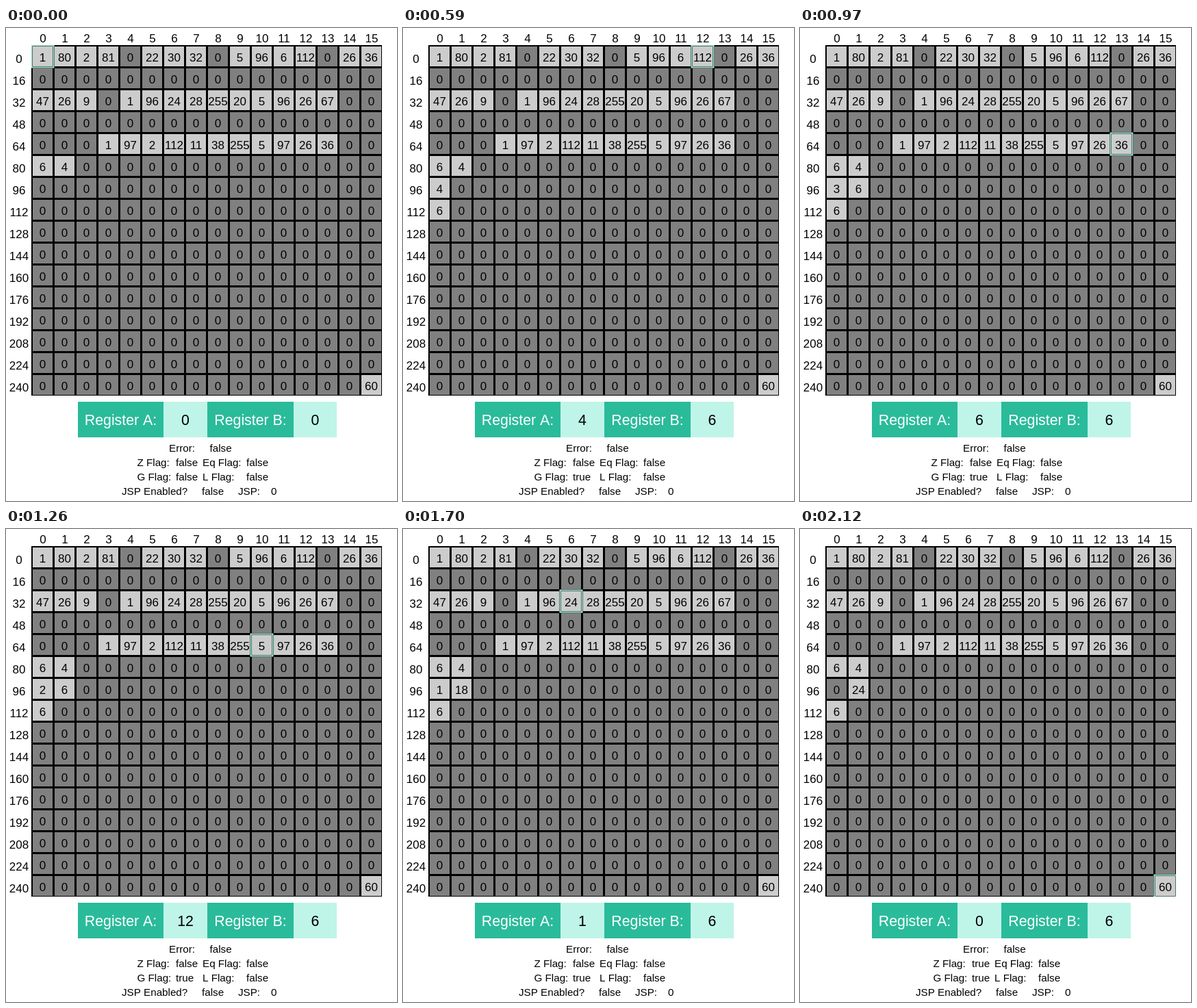
Recreate the animation shown at these times as an HTML page with a canvas. Size 571 by 691 pixels, loop 2.51 s.

```html
<!DOCTYPE html>
<html lang="en">
<head>
<meta charset="utf-8">
<title>Eight-bit machine</title>
<style>
  html, body { margin: 0; width: 100%; height: 100%; overflow: hidden; background: #fff; }
  canvas { display: block; }
</style>
</head>
<body>
<canvas id="stage" width="571" height="691"></canvas>
<script>
const ctx = document.getElementById('stage').getContext('2d');
const FACE = '"Liberation Sans", Arial, sans-serif';
const LOOP = 2510;
const LEFT = 37.5, TOP = 25.5, CELL = 32;

// The program: multiply the bytes at 80 and 81 by repeated addition.
const PROGRAM = {
  0: [1, 80, 2, 81, 0, 22, 30, 32, 0, 5, 96, 6, 112, 0, 26, 36],
  32: [47, 26, 9, 0, 1, 96, 24, 28, 255, 20, 5, 96, 26, 67],
  67: [1, 97, 2, 112, 11, 38, 255, 5, 97, 26, 36],
  80: [6, 4],
  255: [60]
};

// Times at which the display refreshes, and how far the machine has got.
const REFRESH = [410, 500, 580, 660, 740, 790, 850, 910, 970];
for (let t = 1020; t <= 1500; t += 60) REFRESH.push(t);
REFRESH.push(1570, 1640);
for (let t = 1700; t <= 2120; t += 60) REFRESH.push(t);
const PACE = [[0, 0], [410, 4], [740, 23], [790, 27], [2060, 105], [2120, 107]];

const simple = {
  11: m => { m.a = (m.a + m.b) & 255; },
  20: m => { m.a = (m.a - 1) & 255; },
  22: m => { m.g = m.a > m.b; m.eq = m.a === m.b; m.l = m.a < m.b; },
  24: m => { m.z = m.a === 0; },
  47: m => { [m.a, m.b] = [m.b, m.a]; },
  60: m => { m.halted = true; }
};
const withOperand = {
  1: (m, n) => { m.a = m.mem[n]; },
  2: (m, n) => { m.b = m.mem[n]; },
  5: (m, n) => { m.mem[n] = m.a; },
  6: (m, n) => { m.mem[n] = m.b; },
  26: (m, n) => { m.pc = n; },
  28: (m, n) => { if (m.z) m.pc = n; },
  30: (m, n) => { if (m.g) m.pc = n; },
  38: (m, n) => { if (m.error) m.pc = n; }
};

// One byte is handled per tick; a snapshot is kept after each.
function run() {
  const m = { mem: new Array(256).fill(0), a: 0, b: 0, pc: 0, op: null,
    z: false, g: false, eq: false, l: false, error: false, halted: false };
  for (const at in PROGRAM) PROGRAM[at].forEach((v, i) => { m.mem[+at + i] = v; });
  const log = [];
  while (!m.halted && log.length < 500) {
    m.at = m.pc;
    const byte = m.mem[m.pc++];
    if (m.op) {
      m.op(m, byte);
      m.op = null;
    } else if (withOperand[byte]) {
      m.op = withOperand[byte];
    } else if (simple[byte]) {
      simple[byte](m);
    }
    log.push({ ...m, mem: m.mem.slice() });
  }
  return log;
}
const states = run();

function tickAt(time) {
  let shown = 0;
  for (const t of REFRESH) if (t <= time) shown = t;
  let i = 0;
  while (i < PACE.length - 2 && PACE[i + 1][0] < shown) i++;
  const [t0, n0] = PACE[i], [t1, n1] = PACE[i + 1];
  const n = Math.round(n0 + (n1 - n0) * (shown - t0) / (t1 - t0));
  return Math.min(n, states.length - 1);
}

function text(str, x, y, size, align = 'left', color = '#000') {
  ctx.font = size + 'px ' + FACE;
  ctx.textAlign = align;
  ctx.fillStyle = color;
  ctx.fillText(str, x, y);
}

function box(x, y, w, h, color) {
  ctx.fillStyle = color;
  ctx.fillRect(x, y, w, h);
}

function drawMemory(s) {
  ctx.save();
  ctx.beginPath();
  ctx.rect(37, 24.5, 512, 512.5);
  ctx.clip();
  box(LEFT - 1.5, TOP - 0.5, 515, 515, '#000');
  s.mem.forEach((v, i) => {
    const x = LEFT + i % 16 * CELL, y = TOP + (i >> 4) * CELL;
    box(x + 1.5, y + 1.5, CELL - 3, CELL - 3, v ? '#ccc' : '#808080');
    text(v, x + 16, y + 23.5, 17, 'center');
  });
  ctx.strokeStyle = '#a4e6d6';
  ctx.lineWidth = 2;
  ctx.strokeRect(LEFT + s.at % 16 * CELL, TOP + (s.at >> 4) * CELL, CELL, CELL);
  ctx.restore();
  for (let i = 0; i < 16; i++) {
    text(i, 54 + i * CELL, 21, 17, 'center');
    text(i * 16, 19, 51 + i * CELL, 17, 'center');
  }
}

function drawRegister(name, value, x, w, valueW) {
  box(x, 546, w, 52, '#2abb9b');
  box(x + w, 546, valueW, 52, '#bff5e8');
  text('Register ' + name + ':', x + w / 2, 580, 21.33, 'center', '#fff');
  text(value, x + w + valueW / 2, 580, 21.33, 'center');
}

function drawFlags(s) {
  const put = (str, x, y) => text(str, x, y, 15.2);
  // The centred table narrows when its first value column holds only "true".
  const d = s.z && s.g ? 3 : 0;
  put('Error:', 238, 619);
  put(s.error, 297.5, 619);
  [['Z', s.z, 'Eq', s.eq], ['G', s.g, 'L', s.l]].forEach(([p, pv, q, qv], i) => {
    const y = 640 + i * 21;
    put(p + ' Flag:', 191.5 + d, y);
    put(pv, 248 + d, y);
    put(q + ' Flag:', 287 - d, y);
    put(qv, 351 - d, y);
  });
  put('JSP Enabled?', 169, 682);
  put('false', 286, 682);
  put('JSP:', 339, 682);
  put('0', 387, 682);
}

function draw(time) {
  const s = states[tickAt(time)];
  box(0, 0, 571, 691, '#fff');
  drawMemory(s);
  drawRegister('A', s.a, 105, 125, 64);
  drawRegister('B', s.b, 294, 126, 63);
  drawFlags(s);
}

const start = performance.now();
function loop() {
  draw((performance.now() - start) % LOOP);
  requestAnimationFrame(loop);
}
loop();
</script>
</body>
</html>
```
